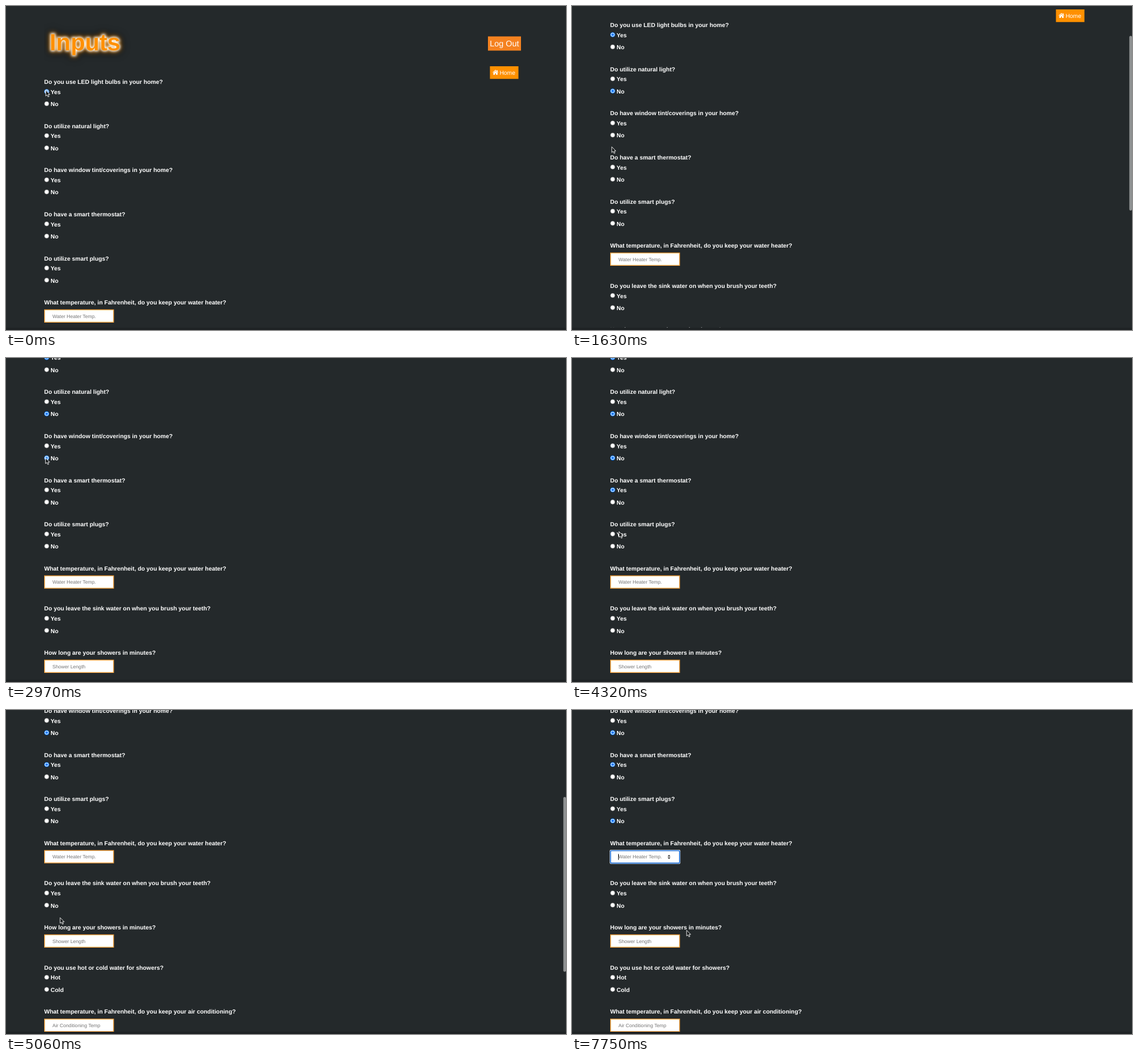
An HTML page that plays this animation: 983x570 px, repeating every 8000 ms.

```html
<!DOCTYPE html>
<html lang="en">
<head>
<meta charset="utf-8">
<title>Inputs</title>
<style>
  html, body { margin: 0; width: 100%; height: 100%; overflow: hidden; background: #24292b; }
  svg { display: block; }
  text { font: 10.34px "Liberation Sans", Arial, sans-serif; fill: #fff; text-rendering: geometricPrecision; }
  .bold { font-weight: bold; }
  .hint { font-size: 8.617px; fill: #757575; }
  .title text { font-size: 41.4px; font-weight: bold; fill: #ff9000; }
  .title .shade { fill: #000; stroke: #000; stroke-width: 4px; filter: blur(8px); }
  .title .warm { stroke: #ff9000; stroke-width: 3px; filter: blur(5px); }
  .title .white { fill: #fff; stroke: #fff; stroke-width: 3px; filter: blur(2.2px); }
</style>
</head>
<body>
<svg width="983" height="570" viewBox="0 0 983 570">
  <clipPath id="titleBox"><path d="M67 20H240V110H67Z"/></clipPath>
  <g id="page">
    <g class="title" clip-path="url(#titleBox)">
      <text class="shade" x="76.6" y="77.5">Inputs</text>
      <text class="warm" x="76.6" y="77.5">Inputs</text>
      <text class="white" x="76.6" y="77.5">Inputs</text>
      <text x="76.6" y="77.5">Inputs</text>
    </g>
    <path d="M846 53.5H904V78.5H846Z" fill="#f58220"/>
    <text x="849.3" y="71" style="font-size:14.37px">Log Out</text>
    <path d="M849.5 106H899.5V128.3H849.5Z" fill="#ff9000"/>
    <path d="M859.2 112.3L861.6 114.4V113H863V115.6L864.2 116.7L863.5 117.4L859.2 113.7L854.9 117.4L854.2 116.7ZM859.2 114.5L862.9 117.7V121H860.2V118.4H858.2V121H855.5V117.7Z" fill="#fff"/>
    <text x="866.4" y="120.6">Home</text>
    <g id="form"></g>
    <g id="focus">
      <rect x="66.2" y="533.4" width="124" height="24.6" rx="2.2" fill="#fff"/>
      <rect x="67.6" y="534.8" width="121.2" height="21.8" rx="1.2" fill="#fff" stroke="#1467d2" stroke-width="1.7"/>
      <text class="hint" x="81.4" y="548.6">Water Heater Temp.</text>
    </g>
    <path id="spinner" d="M167.8 545L170.3 541.9L172.8 545ZM167.8 546.6H172.8L170.3 549.7Z" fill="#444"/>
    <path id="caret" d="M81.6 540.5V551" stroke="#000" stroke-width="1"/>
  </g>
  <path d="M0 566H983V570H0Z" fill="#1e2224"/>
  <rect id="thumb" x="978.3" width="4.7" height="307.5" rx="2.3" fill="#8e9192"/>
  <path id="cursor" d="M0 0V10L2.3 8L4 11.6L5.7 10.9L4.2 7.4H7.2Z" fill="#16191a" stroke="#fff" stroke-width=".9"/>
</svg>
<script>
const TICK = 148.8, LOOP = 8000;
const $ = id => document.getElementById(id);

const yesNo = ['Yes', 'No'];
const questions = [
  ['Do you use LED light bulbs in your home?', yesNo],
  ['Do utilize natural light?', yesNo],
  ['Do have window tint/coverings in your home?', yesNo],
  ['Do have a smart thermostat?', yesNo],
  ['Do utilize smart plugs?', yesNo],
  ['What temperature, in Fahrenheit, do you keep your water heater?', 'Water Heater Temp.'],
  ['Do you leave the sink water on when you brush your teeth?', yesNo],
  ['How long are your showers in minutes?', 'Shower Length'],
  ['Do you use hot or cold water for showers?', ['Hot', 'Cold']],
  ['What temperature, in Fahrenheit, do you keep your air conditioning?', 'Air Conditioning Temp']
];

// radio index, tick of the press, tick of the release
const clicks = [[0, 0, 1], [3, 9, 11], [5, 20, 21], [6, 27, 29], [9, 39, 40]];

// tick, x, y
const pointer = [
  [0, 69.8, 148.3], [4, 79, 200], [8, 69.8, 247.5], [13, 69.8, 247.8], [20, 69.3, 175.8],
  [28, 70, 232], [30, 95, 378.8], [32, 95, 378.8], [34, 95, 365.3], [39, 70, 192.5],
  [43, 166, 253], [46, 166, 253], [49, 201.2, 387.5]
];

// tick, offset
const scroll = [[10, 0], [11, 100], [12, 151.3], [31, 151.3], [32, 185], [33, 262], [34, 287.3]];

function buildForm() {
  let y = 133.5, html = '';
  for (const [label, field] of questions) {
    html += `<text class="bold" x="67" y="${y + 3.6}">${label}</text>`;
    if (Array.isArray(field)) {
      field.forEach((name, i) => {
        const cy = y + 17 + i * 21.4;
        html += `<g class="radio"><circle cx="71.4" cy="${cy}" r="3.8" fill="#fff" stroke-width=".8"/>
          <circle cx="71.4" cy="${cy}" r="2.3"/></g>
          <text class="bold" x="78.3" y="${cy + 4.3}">${name}</text>`;
      });
      y += 77.6;
    } else {
      html += `<rect x="67.7" y="${y + 1.9 + 11.1}" width="121.1" height="21.8" fill="#fff" stroke="#f7a440" stroke-width="1.4"/>
        <text class="hint" x="81.4" y="${y + 27.1}">${field}</text>`;
      y += 70.7;
    }
  }
  $('form').innerHTML = html;
}

// Linear value between [tick, ...values] keys
function sample(keys, tick) {
  const next = keys.findIndex(key => key[0] > tick);
  if (next < 0) return keys[keys.length - 1].slice(1);
  if (next === 0) return keys[0].slice(1);
  const a = keys[next - 1], b = keys[next];
  const part = (tick - a[0]) / (b[0] - a[0]);
  return a.slice(1).map((v, i) => v + (b[i + 1] - v) * part);
}

const show = (id, on) => $(id).style.display = on ? '' : 'none';
const within = (v, from, to) => v >= from && v < to;

buildForm();
const radios = [...document.querySelectorAll('.radio')];

function paintRadio([ring, dot], color) {
  ring.setAttribute('stroke', color || '#8a8a8a');
  ring.setAttribute('stroke-width', color ? 1.1 : .6);
  dot.setAttribute('fill', color || '#fff');
}

function draw(tick) {
  const [offset] = sample(scroll, tick);
  const [x, y] = sample(pointer, tick);
  $('page').setAttribute('transform', `translate(0 ${-offset})`);
  $('cursor').setAttribute('transform', `translate(${x} ${y})`);
  $('thumb').setAttribute('y', offset * .537 - 1.3);
  show('thumb', within(tick, 11, 16) || within(tick, 32, 38));
  show('focus', tick >= 45);
  show('spinner', tick >= 43);
  show('caret', within(tick, 45, 48) || tick >= 52);
  radios.forEach((radio, i) => {
    const click = clicks.find(c => c[0] === i && tick >= c[1]);
    paintRadio(radio.children, click && (tick < click[2] ? '#3793ff' : '#0075ff'));
  });
}

const start = performance.now();
function frame() {
  const t = (performance.now() - start) % LOOP;
  draw(Math.floor((t + 10) / TICK));
  requestAnimationFrame(frame);
}
frame();
</script>
</body>
</html>
```
